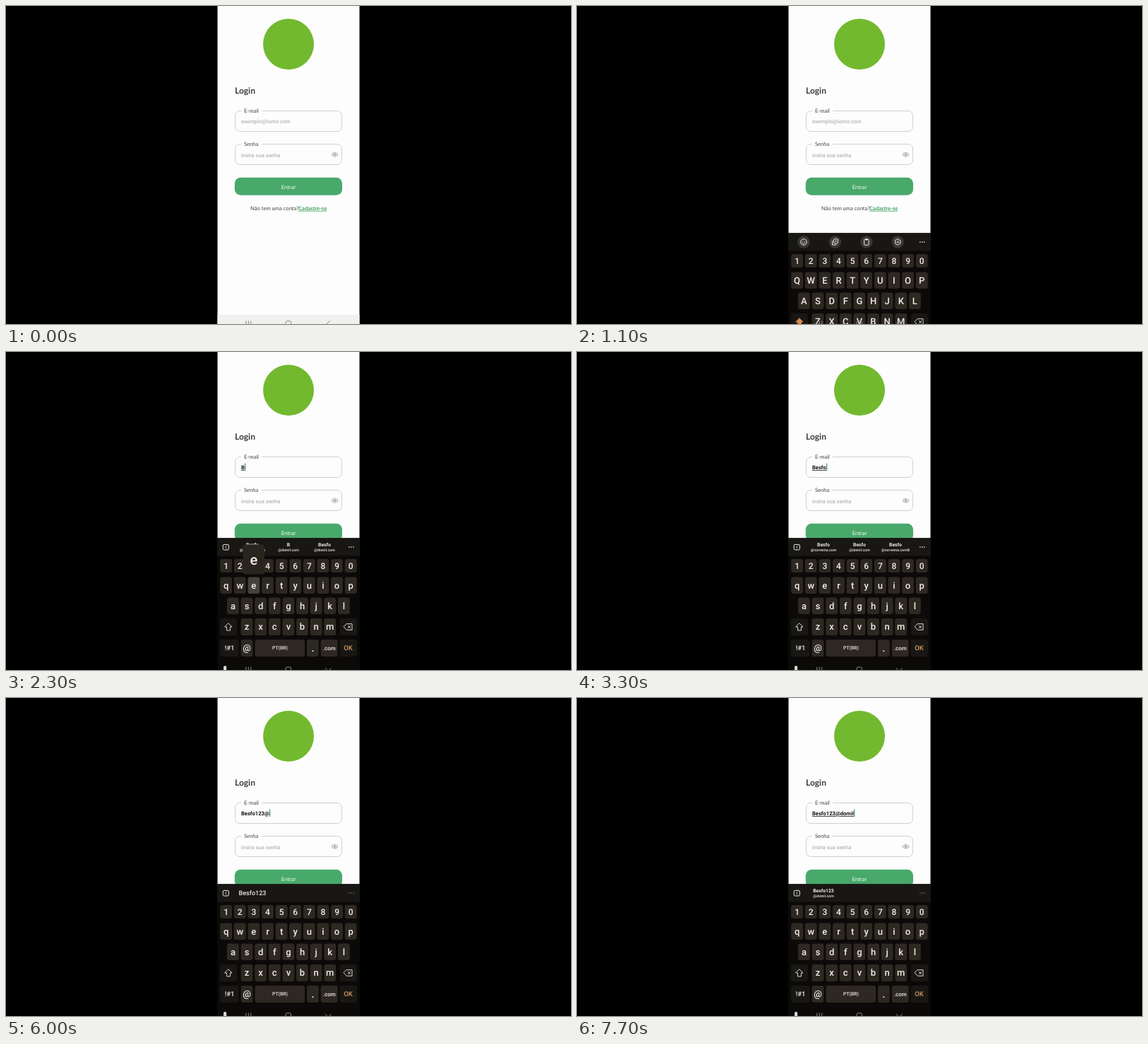
An HTML page that plays this animation: 800x450 px, repeating every 8000 ms.

```html
<!DOCTYPE html>
<html lang="pt-BR">
<head>
<meta charset="utf-8">
<title>Login</title>
<style>
  html, body { margin: 0; width: 100%; height: 100%; overflow: hidden; background: #000; }
  svg { display: block; width: 100vw; height: 100vh; font-family: Roboto, sans-serif; text-rendering: geometricPrecision; }
  .lato { font-family: Lato, sans-serif; }
  .mid { text-anchor: middle; }
</style>
</head>
<body>
<svg id="stage" viewBox="0 0 800 450"></svg>
<script>
const LOOP = 8000, OPEN = 1000, FOCUS = 1200, HOLD = 100;
const NAME = 'Besfo', FIRST_HOST = '@norvema.com', HOST = '@domil.com';
const TYPED = NAME + '123@domil';
const PRESS = [1900, 2300, 2600, 2900, 3200, 4400, 4700, 5200, 5800, 6500, 6800, 7000, 7300, 7600];
const INK = '#f0eeea', KEY = '#2e2822', DARK_KEY = '#191713';

const stage = document.getElementById('stage');
const pen = document.createElement('canvas').getContext('2d');

const text = (s, x, y, size, fill, more = '') =>
  `<text x="${x}" y="${y}" font-size="${size}" fill="${fill}" ${more}>${s}</text>`;
const mid = (s, x, y, size, fill = INK, weight = 500) =>
  text(s, x, y, size, fill, `class="mid" font-weight="${weight}"`);
const box = (x, y, w, h, r, fill, more = '') =>
  `<rect x="${x}" y="${y}" width="${w}" height="${h}" rx="${r}" fill="${fill}" ${more}/>`;
const line = (d, color, width = 1, fill = 'none') =>
  `<path d="${d}" fill="${fill}" stroke="${color}" stroke-width="${width}" stroke-linejoin="round" stroke-linecap="round"/>`;
const dot = (x, y, r, fill, more = '') => `<circle cx="${x}" cy="${y}" r="${r}" fill="${fill}" ${more}/>`;

// Character keys: rows of [characters, first centre x, top, height]
const keys = [
  ['1234567890', 311.6, 293, 19],
  ['qwertyuiop', 311.6, 318.5, 23.5],
  ['asdfghjkl', 321.4, 347.5, 23.5],
  ['zxcvbnm', 341, 377, 24],
  ['@', 341, 407, 24]
].flatMap(([chars, x, y, h]) => [...chars].map((c, i) => ({ c, x: x + i * 19.62, y, h })));

function field(label, y) {
  return box(324.5, y + .5, 151, 29, 6.5, 'none', 'stroke="#d0d0d0"') +
    box(333, y - 2, 29, 5, 0, '#fdfdfd') +
    text(label, 337, y + 2.6, 7.6, '#444', 'class="lato"');
}

function page(n, cursor) {
  const value = TYPED.slice(0, n);
  pen.font = 'bold 76px Roboto, sans-serif';
  const end = 333.3 + pen.measureText(value).width / 10;
  const underline = n === 9 ? '' : 'text-decoration="underline"';
  return box(299.5, 0, 201, 450, 0, '#fdfdfd') +
    dot(400, 54, 36, '#72b92f') +
    text('Login', 324, 123.8, 12, '#3a3a3a', 'class="lato" font-weight="700"') +
    field('E-mail', 148) + field('Senha', 195) +
    (n ? text(value, 333, 166, 7.6, '#111', 'font-weight="700" ' + underline)
       : text('exemplo@lomir.com', 333, 166, 7.6, '#b5b5b5', 'font-weight="500"')) +
    (cursor ? box(end, 157.5, 1, 10.5, 0, '#2d7d70') : '') +
    text('insira sua senha', 333, 213.5, 7.6, '#b5b5b5', 'font-weight="500"') +
    line('M461 210.3q4.3-6 8.8 0q-4.5 6-8.8 0z', '#b0b0b0', 1.1) + dot(465.4, 210.3, 1.7, '#a4a4a4') +
    box(323.8, 242.7, 152.2, 25, 8.5, '#49a96b') +
    text('Entrar', 400, 258.6, 7.6, '#f4fff7', 'class="lato mid"') +
    text('Não tem uma conta?', 346, 288.8, 7.6, '#444', 'class="lato"') +
    text('Cadastre-se', 414, 288.8, 7.6, '#3f9f60', 'class="lato" font-weight="700" text-decoration="underline"');
}

function toolIcons() {
  return [321, 365.4, 409.8, 454.2].map(x => dot(x, 276, 8.7, '#393733')).join('') +
    dot(321, 276, 4.3, 'none', `stroke="${INK}"`) +
    dot(319.5, 275, .6, INK) + dot(322.5, 275, .6, INK) + line('M319 277.3q2 2 4 0', INK, .8) +
    box(363.5, 271.8, 6, 6, 1, 'none', `stroke="${INK}"`) + line('M361.5 274.5v5.5h5.5', INK) +
    dot(366.5, 274.8, 1, INK) +
    box(406.6, 272.3, 6.6, 8, 1, 'none', `stroke="${INK}"`) + box(408.2, 271.2, 3.4, 2.2, .6, INK) +
    line('M454.2 271.7l3.7 2.1v4.4l-3.7 2.1l-3.7-2.1v-4.4z', INK) +
    dot(454.2, 276, 1.3, 'none', `stroke="${INK}" stroke-width=".8"`);
}

function suggestions(n) {
  const pair = (top, host, x) => mid(top, x, 274.6, 6.8, INK, 700) + mid(host, x, 282.4, 5.2);
  const value = TYPED.slice(0, n);
  let words;
  if (n < 7) {
    words = pair(NAME, FIRST_HOST, 349) + pair(value.slice(0, 5), HOST, 400) +
      pair(NAME, n < 2 ? HOST : FIRST_HOST + NAME[0], 451);
  } else if (n < 10) {
    words = mid(value.slice(0, 8), 349, 279.3, 9);
  } else {
    words = pair(TYPED.slice(0, 8), HOST, 349);
  }
  return box(307.2, 272.4, 8.2, 7.6, 1.6, 'none', `stroke="${INK}"`) +
    line('M312.2 274.4l-1.8 1.8l1.8 1.8', INK, .9) + words;
}

function keyboard(n, active) {
  const upper = n === 0;
  const show = c => upper ? c.toUpperCase() : c;
  const dots = n < 7 ? INK : '#6d6a66';
  let s = box(299, 263.3, 202, 190, 0, '#0b0a08') + box(299, 263.3, 202, 25.2, 0, '#191714');
  s += n ? suggestions(n) : toolIcons();
  s += [485.9, 488.9, 491.9].map(x => dot(x, 276, .85, dots)).join('');
  for (const k of keys) {
    s += box(k.x - 8.4, k.y, 16.8, k.h, 3, k.c === active ? '#454239' : KEY) +
      mid(show(k.c), k.x, k.y + k.h / 2 + 4.4, k.h < 20 ? 12 : 13);
  }
  s += box(303, 377, 24, 24, 3, DARK_KEY) + box(473, 377, 24, 24, 3, DARK_KEY) +
    line('M315 384l5 5h-2.6v5h-4.8v-5h-2.6z', upper ? '#d98a4c' : INK, .9, upper ? '#d98a4c' : 'none') +
    line('M482.3 384.7h7.7v8.6h-7.7l-4-4.3zM484.2 387.3l3.4 3.4m0-3.4l-3.4 3.4', INK, .9) +
    box(303, 407, 26.5, 24, 3, DARK_KEY) + mid('!#1', 316.5, 422.4, 9.5) +
    box(352.5, 407, 70.5, 24, 3, KEY) + mid('PT(BR)', 388, 421.3, 6.8) +
    box(426, 407, 16.8, 24, 3, KEY) + mid('.', 434.4, 424, 13, INK, 700) +
    box(445.7, 407, 24, 24, 3, KEY) + mid('.com', 457.8, 421.8, 8) +
    box(472.5, 407, 24.5, 24, 3, DARK_KEY) + mid('OK', 484.5, 422.4, 9.5, '#d09a66') +
    box(308, 444, 4.2, 10, 2, '#d8d6d2');

  const k = keys.find(k => k.c === active);
  if (k) {
    const x = Math.max(302, Math.min(465.5, k.x - 15.3)), y = k.y - 46;
    s += box(x, y, 30.6, 42, 4, '#29241e') + mid(show(k.c), x + 15.3, y + 28.5, 20);
  }
  return s;
}

function navIcons(open) {
  const c = open ? '#8d8b88' : '#858585';
  return line('M339.8 446v6M343.3 446v6M346.8 446v6', c) +
    box(396, 445.8, 7.5, 8, 2.2, 'none', `stroke="${c}"`) +
    line(open ? 'M452 447.5l4.3 4l4.3-4' : 'M458.5 445.5l-5 5', c);
}

function scene(t) {
  const n = PRESS.filter(p => t >= p + HOLD).length;
  const down = PRESS.findIndex(p => t >= p && t < p + HOLD);
  const active = down < 0 ? '' : TYPED[down].toLowerCase();
  const since = t - (n ? PRESS[n - 1] + HOLD : FOCUS);
  const cursor = since >= 0 && since % 1000 < 500;
  const open = t >= OPEN;
  const slide = open ? Math.round(186 * .31 ** ((t - OPEN) / 100)) : 186;
  return page(n, cursor) +
    box(299.5, 437, 201, 13, 0, open ? '#0b0a08' : '#f0f0f0') +
    (open ? `<g transform="translate(0 ${slide})">${keyboard(n, active)}</g>` : '') +
    navIcons(open);
}

let last = '';
function frame(now) {
  const next = scene(Math.floor(now % LOOP / 100) * 100);
  if (next !== last) stage.innerHTML = last = next;
  requestAnimationFrame(frame);
}
frame(0);
</script>
</body>
</html>
```
